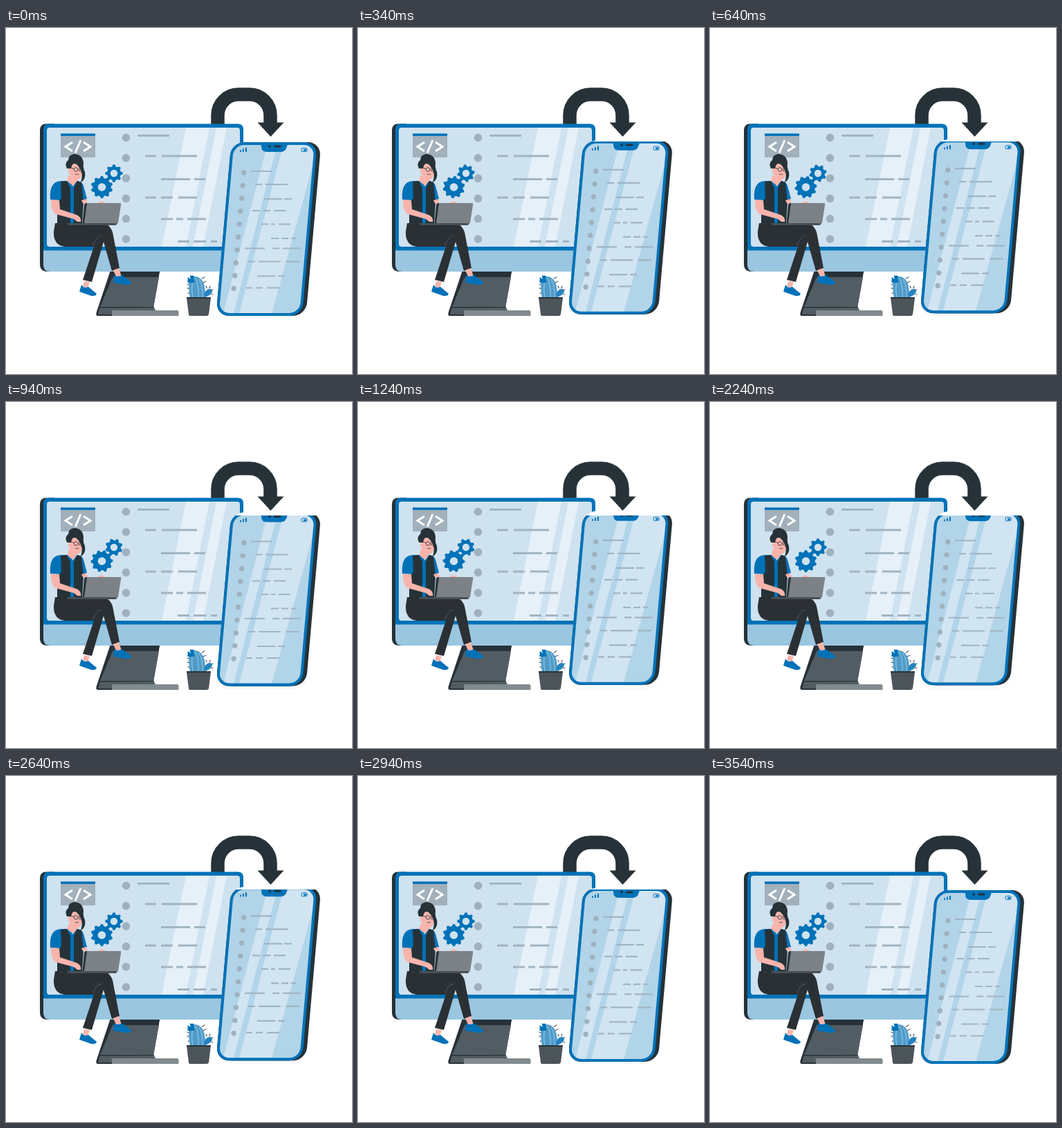
These frames come from a looping animation (500 by 500 pixels, 3.64 s). An HTML page:

```html
<!DOCTYPE html>
<html lang="en">
<head>
<meta charset="utf-8">
<title>Desktop to phone</title>
<style>
html, body { margin: 0; width: 100%; height: 100%; overflow: hidden; background: #fff; }
svg { display: block; width: 100vw; height: 100vh; }
.blue { fill: #0072b8; }
.dark { fill: #263238; }
.skin { fill: #f9b4ac; }
.line { fill: none; stroke-linecap: round; stroke-linejoin: round; }
.bars { stroke: #a1b4c1; }
.dots { fill: #9fb1be; }
</style>
</head>
<body>
<svg viewBox="0 0 500 500">
  <defs>
    <clipPath id="below"><rect y="164" width="500" height="336"/></clipPath>
    <clipPath id="glass"><rect x="1" y="1" width="122.500" height="249" rx="18" transform="matrix(1 0 -.088 1 325.500 165)"/></clipPath>
    <g id="body" transform="matrix(1 0 -.088 1 325.500 165)">
      <rect x="5.500" width="124.500" height="251" rx="19"/>
      <rect width="124.500" height="251" rx="19"/>
    </g>
  </defs>

  <!-- arrow -->
  <path d="M306 140V126A30 30 0 0 1 336 96H352A30 30 0 0 1 382 126V139" fill="none" stroke="#263238" stroke-width="19.500"/>
  <path class="dark" d="M363.500 136.500H401.500L382.500 157Z"/>

  <!-- stand -->
  <path class="dark" d="M151 350H222.500L213 404L160 416H133Q129 416 131 410Z"/>
  <path d="M154 360H221L213 404H153V414H133L136 403Z" fill="#535c62"/>
  <path class="dark" d="M136 403H214V404.500H135Z"/>
  <path d="M153 408H247Q250 408 249.500 412V416H153Z" fill="#818a8e"/>
  <path d="M214 404L216 408H153V404.500Z" fill="#535c62"/>

  <!-- monitor -->
  <path class="dark" d="M58 138.500H70V352H60Q49 352 49 341V148Q49 138.500 58 138.500Z"/>
  <path d="M54 310H343V352H64Q54 352 54 342Z" fill="#9ac6e0"/>
  <path class="blue" d="M62 138.500H335Q343 138.500 343 146.500V321.500H54V146.500Q54 138.500 62 138.500Z"/>
  <rect x="59" y="144" width="279" height="172" rx="4" fill="#cfe2ef"/>
  <path d="M260 144H294L260 316H225ZM304 144H319L285 316H270Z" fill="#e5f0f9"/>
  <g id="desk"></g>

  <!-- code window -->
  <path d="M79 155H129V187H79Z" fill="#a1b0ba"/>
  <path class="blue" d="M79 152.500H129V156H79Z"/>
  <path d="M96 165L86 171.500L96 178M108 162L100 180.500M112 165L122 171.500L112 178" fill="none" stroke="#fff" stroke-width="3"/>

  <path id="big" class="blue" fill-rule="evenodd"/>
  <path id="small" class="blue" fill-rule="evenodd"/>

  <!-- woman -->
  <path class="blue" d="M80 221L91 221L97 229L101 221Q110 221 112 228L117 247L109 250L110 283H76L77 249L64 248Q62 221 80 221Z"/>
  <path class="dark" d="M79 222L88 221L93 231V283H74V256L80 245ZM103 221L109 223L112 252L110 283H98V231Z"/>
  <path class="skin" d="M91 213H103L102 222L97 228L88 221Z"/>
  <path class="skin" d="M90 200Q89 193 99 193Q109 194 110 203Q111 215 105 219Q101 222 96 217L90 208Z"/>
  <path class="dark" d="M88 203Q84 195 90 191Q90 183 99 182Q111 183 112 195Q111 202 114 208Q116 219 108 223Q112 210 107 204Q103 195 98 196Q95 197 94 203Z"/>
  <g fill="none" stroke="#263238" stroke-width=".8"><circle cx="101" cy="204.500" r="2.800"/><circle cx="107.500" cy="205" r="2.300"/><path d="M98 203.500L93 202M100 211Q103 213 105 211"/></g>
  <path class="skin" d="M65 248L77 249L78 262L102 270Q109 273 108 280L103 280L98 276L72 269Q65 266 65 248Z"/>
  <path class="skin" d="M109 249L116 247L118 253H111ZM132 253Q138 248 144 253Z"/>
  <path d="M71 282H143Q151 286 154 295L164 347L153 351L141 309L124 367L111 364L127 316L85 316Q68 314 69 294Z" fill="#2b3034"/>
  <path d="M126 314Q131 300 139 300" fill="none" stroke="#596065" stroke-width=".8"/>
  <path class="skin" d="M113 366L121 367L118 376L111 373ZM155 350L163 347L167 359L159 359Z"/>
  <path class="blue" d="M109 371Q113 377 119 374L131 384Q130 388 123 387L106 381ZM156 357Q162 361 167 357L181 367Q183 371 174 371L155 368Z"/>

  <!-- laptop -->
  <path d="M116 253H165Q167 253 166 256L162 282H111L114 255Z" fill="#7b8185"/>
  <path class="dark" d="M115 253H117L113 282H110.500L113 255Z"/>
  <path d="M88 282H161L159 285H90Z" fill="#465056"/>

  <!-- cactus -->
  <path class="line" stroke="#263238" d="M262 370l6 2M262 376l6 1M263 383l6 0M283 362l4-2M285 368l4-2M290 376l-1-3M294 376l1-3M297 379l2-1M297 384l2 1"/>
  <path d="M266 390Q260 360 274 359Q289 361 288 390Z" fill="#4f9cca"/>
  <path d="M287 389Q285 382 291 378Q297 375 298 380Q298 385 288 389Z" fill="#2583bd"/>
  <path class="line" d="M270 390Q267 372 271 362M278 390Q279 371 274 361M284 389Q285 373 279 363" stroke="#9cc9e3"/>
  <path class="blue" d="M267 363Q264 356 268 358Q274 357 271 363Q275 369 268 368Q260 370 263 363Q260 358 267 363Z"/>
  <path d="M261 390H296L293 414Q292 416 290 416H267Q264 416 264 414Z" fill="#4c555a"/>
  <path class="dark" d="M261 389H296L295.500 391H261.500Z"/>

  <!-- phone -->
  <use id="mask" href="#body" fill="#fff"/>
  <g clip-path="url(#below)">
    <use href="#body" fill="#fafafa"/>
    <g id="phone">
      <use href="#body" fill="#263238"/>
      <g clip-path="url(#glass)">
        <path d="M300 160H460V420H300Z" fill="#b1d4e8"/>
        <path d="M380 160H394L328 416H313ZM403 160H454L383 416H336Z" fill="#d1e4f1"/>
      </g>
      <rect x="2" y="2" width="120.500" height="247" rx="17" transform="matrix(1 0 -.088 1 325.500 165)" fill="none" stroke="#0072b8" stroke-width="4"/>
      <path class="blue" d="M367 165H410Q407 167 406 171Q404 179 397 179H377Q369 179 369 171Q369 167 367 165Z"/>
      <circle class="dark" cx="381" cy="171" r="1.800"/>
      <path class="line" d="M388.500 171H396" stroke="#263238" stroke-width="3"/>
      <path d="M339 179V176.500M343 179V174.500M347 179V173" stroke="#0072b8" stroke-width="2"/>
      <rect x="427" y="173.500" width="8" height="5" rx="1.500" fill="none" stroke="#0072b8"/>
      <path class="blue" d="M430 175H434V177.500H430Z"/>
      <g id="list"></g>
    </g>
  </g>
</svg>
<script>
const $ = id => document.getElementById(id);

// Each row is "y: from-to from-to ...".
const bars = rows => rows.map(row => {
  const [y, spans] = row.split(':');
  return spans.split(' ').map(s => {
    const [a, b] = s.split('-');
    return `M${a} ${y}H${b}`;
  }).join('');
}).join('');

function fillList(id, rows, width, count, dot) {
  let dots = '';
  for (let i = 0; i < count; i++) {
    const [x, y, r] = dot(i);
    dots += `<circle cx="${x}" cy="${y}" r="${r}"/>`;
  }
  $(id).innerHTML = `<path class="bars" stroke-width="${width}" d="${bars(rows)}"/><g class="dots">${dots}</g>`;
}

fillList('desk', [
  '155.5:190-236', '185:201-217 225-276', '218.5:224-266 272-288',
  '245:201-217 224-241 249-276', '276:224-241 246-256 262-289', '308.5:248-265 271-289 296-305'
], 3.2, 6, i => [173.5, 158.5 + i * 29.3, 5.8]);

fillList('list', [
  '207:354-384', '226:360-370 375-407', '247:373-399 402-413',
  '264:356-367 371-382 387-404', '283.5:369-379 383-389 394-411',
  '304:383-394 398-408 412-419', '318.5:345-374 385-395 400-426',
  '337.5:350-360 365-397 404-424', '358.5:363-389 393-403', '375.5:347-356 361-371 377-395'
], 2.2, 10, i => [343.7 - i * 1.62, 209 + i * 18.6, 3.7]);

function gear(x, y, outer, inner, hole, teeth, turn) {
  let d = '';
  for (let i = 0; i < teeth * 4; i++) {
    const a = ((i - 0.5) / 4 + turn) / teeth * 2 * Math.PI;
    const r = i % 4 < 2 ? outer : inner;
    d += `${i ? 'L' : 'M'}${x + r * Math.sin(a)} ${y - r * Math.cos(a)}`;
  }
  return `${d}ZM${x - hole} ${y}a${hole} ${hole} 0 1 0 ${2 * hole} 0a${hole} ${hole} 0 1 0 ${-2 * hole} 0Z`;
}

const LOOP = 3640, PEAK = 17.5, LAST = 36, RISE = 9.6;

function draw(now) {
  const step = Math.floor((now % LOOP + 60) / 100);
  const lift = RISE * (step < PEAK ? step / PEAK : (LAST - step) / (LAST - PEAK));
  const move = `translate(0 ${-lift})`;
  $('phone').setAttribute('transform', move);
  $('mask').setAttribute('transform', move);

  const turn = Math.min(step / 23, 1);
  $('big').setAttribute('d', gear(138.5, 230, 16, 13.2, 5.8, 10, turn));
  $('small').setAttribute('d', gear(156, 210, 12.7, 9.9, 5.2, 8, -turn));
}

const start = performance.now();
function tick() {
  draw(performance.now() - start);
  requestAnimationFrame(tick);
}
tick();
</script>
</body>
</html>
```
